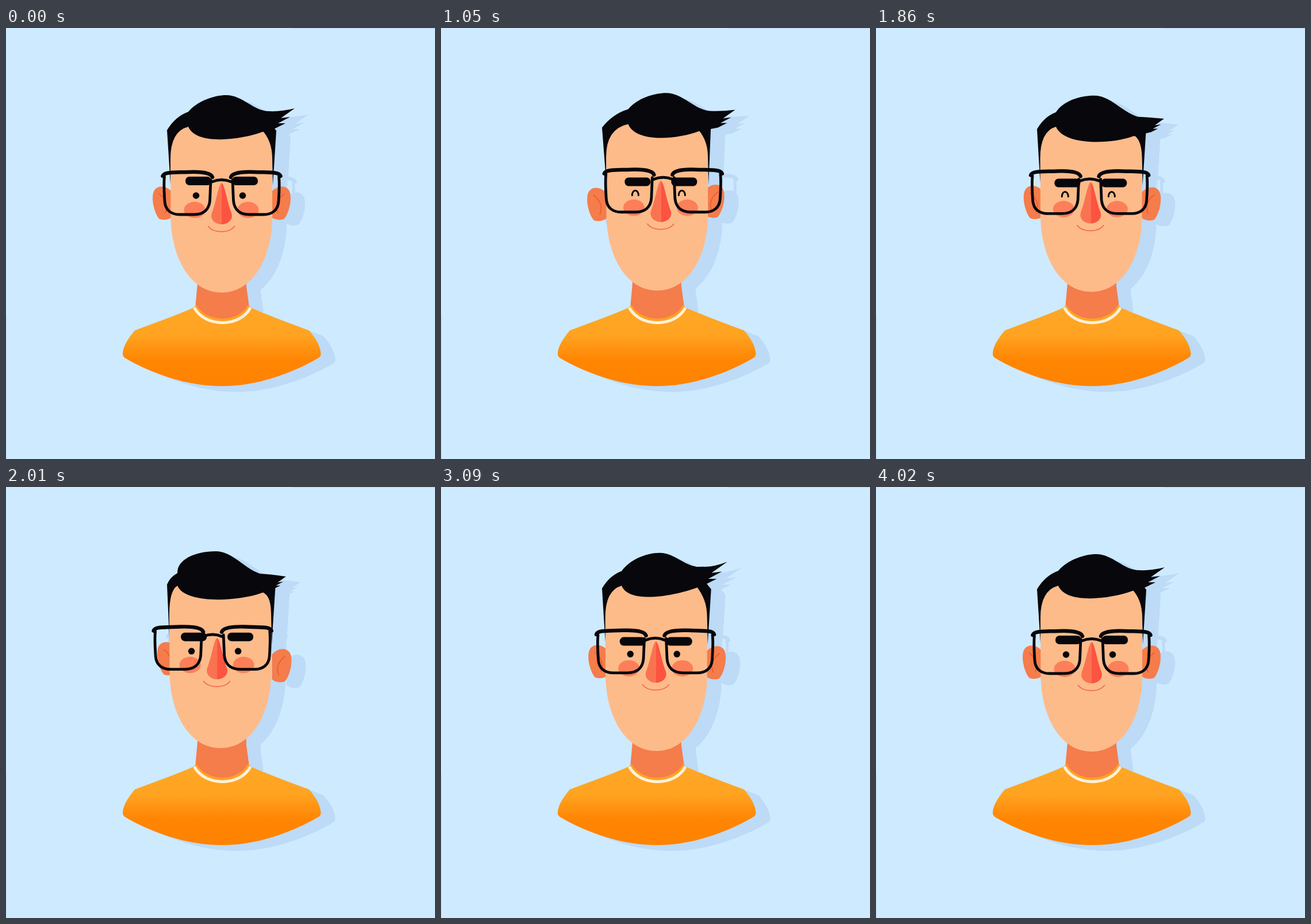
Recreate the animation shown at these times as an HTML page with a canvas. Size 746x751 px, loop 4080 ms.

```html
<!DOCTYPE html>
<html lang="en">
<head>
<meta charset="utf-8">
<title>Portrait</title>
<style>
html, body { margin: 0; width: 100%; height: 100%; overflow: hidden; background: #ceeaff; }
canvas { display: block; }
</style>
</head>
<body>
<canvas id="stage" width="746" height="751"></canvas>
<script>
const ctx = document.getElementById('stage').getContext('2d');
const LOOP = 4080, STEP = 30, TURN = 385, SETTLE = 720;
const INK = '#07070c', SKIN = '#fdbb8a', BLUSH = '#f57c4b', SHADE = '#bddaf6';

// Head turns: side -1 is left, 1 is right; swing is how far the fringe droops
const MOVES = [
  { start: 840, side: 1, swing: 9 },
  { start: 1640, side: -1, swing: 24 },
  { start: 2800, side: 0, swing: -9 }
];

const SHIRT = new Path2D('M327 487C297 500 259 514 224 527C212 541 203 556 203 568Q203 572 207 575C255 603 315 624 376 624C435 624 495 603 543 575Q548 572 547.5 567C546 552 538 540 527 527C491 514 455 500 425 487Z');
const NECK = new Path2D('M334 420L332.5 450L329.5 483C348 517 405 517 422.5 483L418 450L417 420Z');
const TRIM = new Path2D('M329.5 484C348 517 405 517 422.5 484');
const COLLAR = new Path2D('M327.5 487.5C346 522 407 522 425 487.5');
const FACE = new Path2D('M286 225L286.5 330C287 395 318 461 375 461C432 461 463 395 463 330L463 225C463 190 455 172 430 163L320 165C294 170 285 190 286 225Z');
const EAR = new Path2D('M289 286C277 272 258 273 255.5 290C253 308 262 329 267 333C276 335.5 284 334 289 329Z');
const EAR_FOLD = new Path2D('M266 289C276 296 283 308 277 322');
const RIM = new Path2D('M275.5 259C274 272 275 287 276 302C277 318 288 325 302 325L327 325C344 325 353 316 354.5 301L356 265');
const BAR = new Path2D('M272.5 258C275 250 295 252 318 251C342 250 357 253 359 260');
const BRIDGE = new Path2D('M358 268Q375 261 392 268');
const NOSE = new Path2D('M375 270C369 274 366 302 358 322C354 334 364 342 375 342Z');
const SMILE = new Path2D('M351.5 345.5C361 358 388 358 397.5 345.5');
const SHUT = new Path2D('M-5.5 3C-5.500 -8 5.500 -8 5.500 3');

const clamp = v => Math.min(1, Math.max(0, v));
const smooth = p => p * p * (3 - 2 * p);

function at(x, y, draw) {
  ctx.save();
  ctx.translate(x, y);
  draw();
  ctx.restore();
}

function flip(draw) {
  ctx.save();
  ctx.translate(750, 0);
  ctx.scale(-1, 1);
  draw();
  ctx.restore();
}

function fill(path, color) {
  ctx.fillStyle = color;
  ctx.fill(path);
}

function stroke(path, color, width) {
  ctx.strokeStyle = color;
  ctx.lineWidth = width;
  ctx.stroke(path);
}

function oval(x, y, rx, ry, color) {
  const p = new Path2D();
  p.ellipse(x, y, rx, ry, 0, 0, 7);
  fill(p, color);
}

function poseAt(t) {
  let h = 0, swing = 0, frown = 0, shut = false;
  for (const m of MOVES) {
    const p = clamp((t - m.start) / TURN);
    h += (m.side - h) * smooth(p);
    swing += m.swing * Math.sin(Math.PI * clamp((t - m.start) / SETTLE));
    frown += 5 * Math.sin(Math.PI * p);
    shut = shut || (p > .25 && p < .75);
  }
  return { h, up: Math.abs(h), right: Math.max(h, 0), left: Math.max(-h, 0), swing, frown, shut };
}

function hair(p, color) {
  const { h, up, left, swing } = p;
  const slide = 17 * h - 2 * up, dx = 2 * h;

  // Moves with the head; the farther from the parting, the more it swings
  const lock = (x, y, grip = 1) => {
    const w = swing * ((x - 317) / 185) ** 2;
    return [x + grip * slide + .15 * w, y - 8 * up + w];
  };
  const off = (q, x, y) => [q[0] + x, q[1] + y];

  const part = lock(317, 172 + 8 * left);
  const root = lock(317, 146 + 12 * left);
  const peak = lock(383, 117);
  const dip = lock(458, 145);
  const tip = lock(502, 140);
  const end = lock(446, 181, .2);

  const back = new Path2D();
  const y0 = 178 - 8 * up;
  back.moveTo(280, y0);
  back.quadraticCurveTo((280 + root[0]) / 2 - 4, (y0 + root[1]) / 2 - 8 + 5 * left, ...root);
  back.lineTo(455, 160 - 2 * up);
  back.lineTo(470 - 1.5 * up, 179 - 6 * up);
  back.lineTo(464 + dx, 274);
  back.lineTo(463 + dx, 228 - 6 * up);
  back.bezierCurveTo(463 + dx, 205 - 6 * up, 456, 190 - 4 * up, ...off(end, 0, -2));
  back.lineTo(...part);
  back.quadraticCurveTo(286 + dx, part[1] + 8, 286 + dx, 228 - 6 * up);
  back.lineTo(286 + dx, 272 - 10 * up);
  back.closePath();
  fill(back, color);

  const front = new Path2D();
  front.moveTo(...part);
  front.quadraticCurveTo(...off(root, 0, 14), ...root);
  front.bezierCurveTo(...off(root, 16 - 17 * left, -19 - 4 * left), ...off(peak, -21 - 16 * left, 0), ...peak);
  front.bezierCurveTo(...off(peak, 29, 0), ...off(dip, -28, -.4 * swing), ...dip);
  front.quadraticCurveTo(...off(dip, 20, 1), ...tip);
  const fold = 1 - swing / 60;
  for (let i = 0; i < 3; i++) {
    front.lineTo(...off(tip, (-24 - 5 * i) * fold, (17 + 9 * i) * fold));
    if (i < 2) front.lineTo(...off(tip, (-8 - 8 * i) * fold, (15 + 11 * i) * fold));
  }
  front.lineTo(...end);
  front.bezierCurveTo(...off(end, -41, 15), ...off(part, 13, 32), ...part);
  fill(front, color);
}

function ears(p, color, crease) {
  const one = () => {
    fill(EAR, color);
    if (crease) stroke(EAR_FOLD, crease, 1.3);
  };
  at(8 * p.left - 1.5 * p.right, 4 * p.right - 6 * p.left, one);
  at(1.5 * p.left - 4 * p.right, 6 * p.left - 6 * p.right, () => flip(one));
}

function glasses(p, color) {
  const lens = () => {
    stroke(RIM, color, 4.8);
    stroke(BAR, color, 6.5);
  };
  at(18 * p.h + 2 * p.up, -7.5 * p.up, () => {
    lens();
    flip(lens);
    stroke(BRIDGE, color, 5);
  });
}

function face(p, color) {
  at(2 * p.h, -6 * p.up, () => fill(FACE, color));
}

function features(p) {
  const dx = 13 * p.right - 8 * p.left;
  at(dx, -7 * p.up, () => {
    for (const x of [328, 421]) oval(x, 317, 18.5, 14.2, '#fc7f59');
    fill(NOSE, '#fa7350');
    flip(() => fill(NOSE, '#fd5341'));
    stroke(SMILE, '#f5694a', 1.8);
  });
  at(dx, -6 * p.up, () => {
    for (const x of [330.5, 411.5]) {
      if (p.shut) at(x, 292, () => stroke(SHUT, INK, 3));
      else oval(x, 292, 5.8, 5.8, INK);
      const brow = new Path2D();
      brow.roundRect(x - 18.5, 259 + p.frown, 45, 15, 7);
      fill(brow, INK);
    }
  });
}

function shadow(p) {
  at(25, 10, () => {
    ears(p, SHADE);
    glasses(p, SHADE);
    fill(SHIRT, SHADE);
    fill(NECK, SHADE);
    face(p, SHADE);
    hair(p, SHADE);
  });
}

const cloth = ctx.createLinearGradient(0, 484, 0, 624);
cloth.addColorStop(0, '#ffa726');
cloth.addColorStop(.37, '#ffa321');
cloth.addColorStop(.68, '#ff8502');
cloth.addColorStop(1, '#ff8300');

function body() {
  fill(SHIRT, cloth);
  fill(NECK, BLUSH);
  ctx.lineCap = 'butt';
  stroke(TRIM, '#ffa322', 4.5);
  stroke(COLLAR, '#fff1da', 5);
  ctx.lineCap = 'round';
}

function draw(t) {
  const p = poseAt(t);
  ctx.fillStyle = '#ceeaff';
  ctx.fillRect(0, 0, 746, 751);
  ctx.fillStyle = '#bfdaee';
  ctx.fillRect(499, 0, 247, 1);
  ctx.fillRect(0, 500, 1, 251);
  ctx.lineCap = ctx.lineJoin = 'round';
  shadow(p);
  body();
  ears(p, BLUSH, '#e4552f');
  face(p, SKIN);
  hair(p, INK);
  features(p);
  glasses(p, INK);
}

const start = performance.now();
function tick(now) {
  const t = Math.max(0, now - start) % LOOP;
  draw(Math.floor(t / STEP) * STEP);
  requestAnimationFrame(tick);
}
draw(0);
requestAnimationFrame(tick);
</script>
</body>
</html>
```
